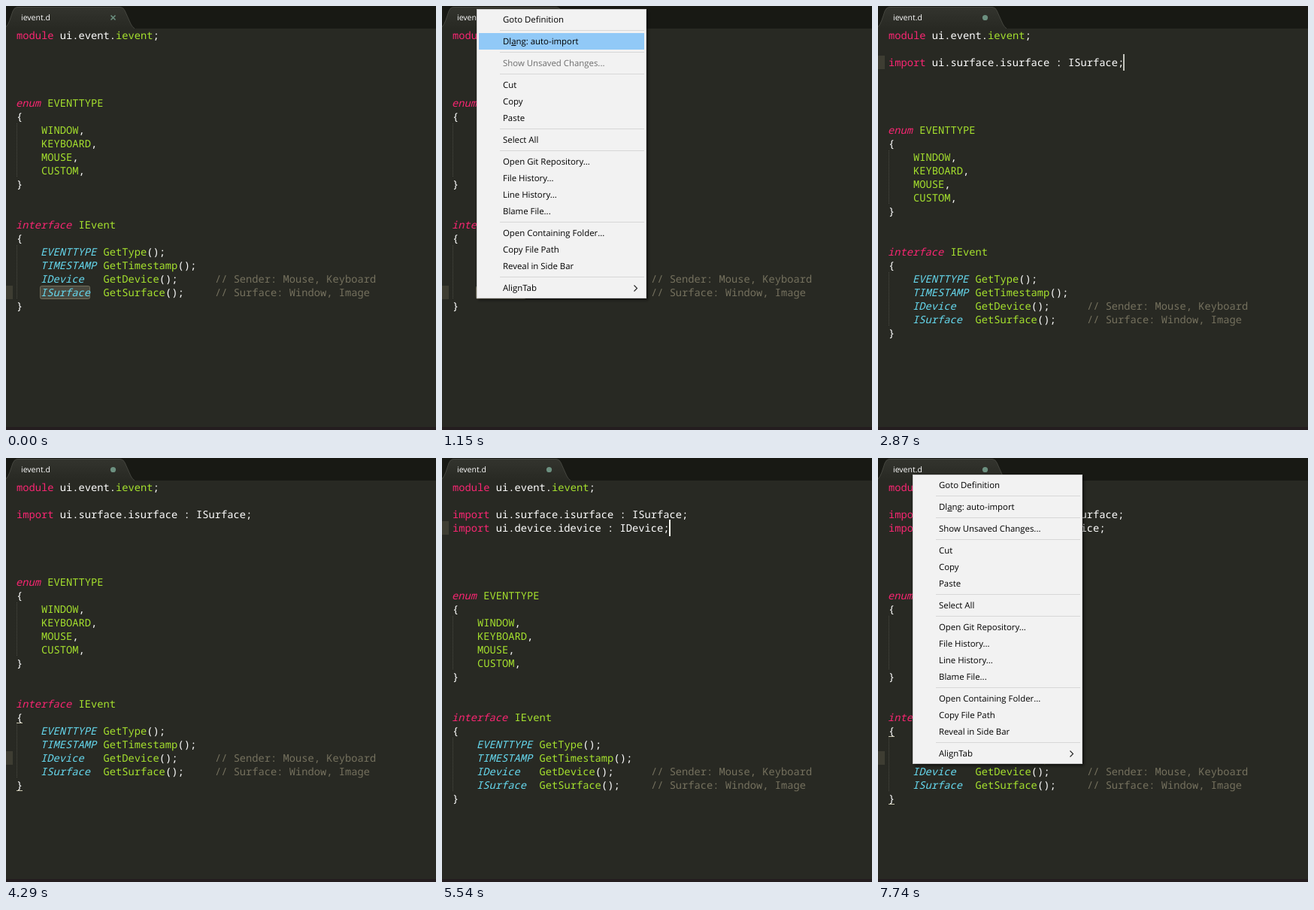
These frames come from a looping animation (572 by 564 pixels, 8 s). An HTML page with a canvas:

```html
<!DOCTYPE html>
<html lang="en">
<head>
<meta charset="utf-8">
<title>Auto-import in an editor</title>
<style>
html, body { margin: 0; height: 100%; overflow: hidden; background: #282923; }
canvas { display: block; }
</style>
</head>
<body>
<canvas id="stage" width="572" height="564"></canvas>
<script>
const ctx = document.getElementById('stage').getContext('2d', { alpha: false });
ctx.textRendering = 'geometricPrecision';

const LOOP = 8000, LEFT = 14, ADVANCE = 8.247, TOP = 30, ROW = 18;
const CODE_FONT = '500 13.745px "Noto Sans Mono", monospace';
const MENU_FONT = '11.4px "Open Sans", sans-serif';

// Each segment starts with a style key: capital letters are italic.
const COLORS = { p: '#f92672', g: '#a6e22e', c: '#66d9ef', w: '#ffffff', n: '#75715e' };
const IMPORTS = [
  'pimport|w ui.surface.isurface : ISurface;',
  'pimport|w ui.device.idevice : IDevice;'
];
const BODY = [
  '', '', '', '',
  'Penum|w |gEVENTTYPE', 'w{',
  'w    |gWINDOW|w,', 'w    |gKEYBOARD|w,', 'w    |gMOUSE|w,', 'w    |gCUSTOM|w,',
  'w}', '', '',
  'Pinterface|w |gIEvent', 'w{',
  'w    |CEVENTTYPE|w |gGetType|w();',
  'w    |CTIMESTAMP|w |gGetTimestamp|w();',
  'w    |CIDevice|w   |gGetDevice|w();      |n// Sender: Mouse, Keyboard',
  'w    |CISurface|w  |gGetSurface|w();     |n// Surface: Window, Image',
  'w}'
];
const MENU = [
  'Goto Definition', '-', 'Dlang: auto-import', '-', 'Show Unsaved Changes...', '-',
  'Cut', 'Copy', 'Paste', '-', 'Select All', '-',
  'Open Git Repository...', 'File History...', 'Line History...', 'Blame File...', '-',
  'Open Containing Folder...', 'Copy File Path', 'Reveal in Side Bar', '-', 'AlignTab'
];

// Every entry changes part of the state from its time on.
const TIMELINE = [
  [0, { imports: 0, row: 19, col: 4, caret: 0, selected: true, menu: 0, menuTop: 4, hover: '' }],
  [70, { menu: .6 }], [230, { menu: 1 }],
  [610, { hover: 'AlignTab' }], [720, { hover: 'Reveal in Side Bar' }],
  [830, { hover: 'Blame File...' }], [940, { hover: 'Paste' }],
  [1040, { hover: 'Cut' }], [1150, { hover: 'Dlang: auto-import' }],
  [1380, { imports: 1, row: 2, col: 38, caret: 1, selected: false, menu: 0, menuTop: 22, hover: '' }],
  [1700, { caret: .66 }], [1860, { caret: .33 }], [2010, { caret: 0 }],
  [2390, { caret: .33 }], [2470, { caret: .66 }], [2560, { caret: 1 }],
  [2870, { caret: .75 }], [2940, { caret: .35 }],
  [3030, { row: 21, col: 4, caret: 1, selected: true }],
  [3400, { caret: .66 }], [3520, { caret: .33 }],
  [3640, { row: 20, caret: 1, selected: false }],
  [4050, { caret: .75 }], [4130, { caret: .5 }], [4210, { caret: .25 }], [4290, { caret: 0 }],
  [4520, { menu: .6 }], [4600, { menu: 1 }],
  [4790, { hover: 'Reveal in Side Bar', caret: .66 }],
  [4980, { hover: 'Line History...', caret: 1 }],
  [5130, { hover: 'Goto Definition', caret: .5 }],
  [5230, { hover: 'Dlang: auto-import', caret: 0 }],
  [5540, { imports: 2, row: 3, col: 35, caret: 1, menu: 0, hover: '' }],
  [5930, { caret: .5 }], [6080, { caret: 0 }],
  [6540, { row: 21, col: 4, caret: 1 }], [6950, { row: 20 }],
  [7360, { caret: .6 }], [7480, { caret: 0 }],
  [7600, { menu: .6 }], [7740, { menu: 1 }]
];

const stateAt = t =>
  Object.assign({}, ...TIMELINE.filter(([start]) => start <= t).map(([, change]) => change));
const colX = col => LEFT + col * ADVANCE;
const rowY = row => TOP + row * ROW;

function rect(x, y, w, h, color) {
  ctx.fillStyle = color;
  ctx.fillRect(x, y, w, h);
}

function text(str, x, y, color, font) {
  ctx.font = font;
  ctx.fillStyle = color;
  ctx.fillText(str, x, y);
}

function stroke(path, color, width = 1) {
  ctx.strokeStyle = color;
  ctx.lineWidth = width;
  ctx.stroke(new Path2D(path));
}

function drawTab(dirty) {
  rect(0, 0, 572, TOP, '#181914');
  const edge = 'M0 28 Q3 25 5 19 L9 7 Q11 1.5 15 1.5 H152 Q156 1.5 158 6 L166 24 Q168 28 171 30';
  const fill = ctx.createLinearGradient(0, 1, 0, TOP);
  fill.addColorStop(0, '#33342e');
  fill.addColorStop(1, '#282923');
  ctx.fillStyle = fill;
  ctx.fill(new Path2D(edge + ' H0 Z'));
  stroke(edge, '#44453e');
  text('ievent.d', 20, 19, '#fff', '500 10.5px "Open Sans", sans-serif');
  if (dirty) {
    ctx.fillStyle = '#6c9080';
    ctx.beginPath();
    ctx.arc(142.5, 15.5, 3.6, 0, 7);
    ctx.fill();
  } else {
    stroke('M139.5 12.5 l6 6 m0 -6 l-6 6', '#6c9080', 1.6);
  }
}

function drawLine(line, row) {
  let col = 0;
  for (const segment of line.split('|')) {
    const key = segment[0], str = segment.slice(1);
    if (!key) continue;
    const italic = key < 'a';
    text(str, colX(col) - (italic ? 1 : 0), rowY(row) + 14,
      COLORS[key.toLowerCase()], (italic ? 'italic ' : '') + CODE_FONT);
    col += str.length;
  }
}

// Box around the eight letters of "ISurface".
function drawMatch(col, row, fill) {
  ctx.beginPath();
  ctx.roundRect(Math.floor(colX(col)) - .5, rowY(row) + .5, 8 * ADVANCE, ROW - 1, 2);
  ctx.fillStyle = fill;
  ctx.fill();
  ctx.strokeStyle = '#75715e';
  ctx.lineWidth = 1;
  ctx.stroke();
}

function drawCode(s) {
  const head = ['pmodule|w ui.event.|gievent|w;'];
  if (s.imports) head.push('', ...IMPORTS.slice(0, s.imports));
  const lines = [...head, ...BODY];
  const opening = lines.lastIndexOf('w{'), closing = lines.length - 1;

  rect(0, rowY(s.row), 9, ROW, '#3e3d32');
  if (s.selected) {
    drawMatch(4, s.row, '#49483e');
    if (s.imports) drawMatch(29, 2, 'transparent');
  }
  ctx.setLineDash([1, 1]);
  for (const first of [lines.indexOf('w{') + 1, opening + 1])
    stroke(`M14.5 ${rowY(first)} v${4 * ROW}`, '#4a4b43');
  ctx.setLineDash([]);
  lines.forEach(drawLine);
  if (!s.selected && s.row > opening)
    for (const row of [opening, closing]) rect(14, rowY(row) + 16, 8, 1, '#c9c5ae');

  ctx.globalAlpha = s.caret;
  rect(Math.round(colX(s.col)) - 1, rowY(s.row) - 2, 2, 22, '#f8f8f0');
  ctx.globalAlpha = 1;
}

function drawMenu(s) {
  ctx.globalAlpha = s.menu;
  ctx.shadowColor = 'rgba(0,0,0,.6)';
  ctx.shadowBlur = 4;
  ctx.shadowOffsetX = ctx.shadowOffsetY = 2;
  rect(46, s.menuTop, 226, 385, '#cccccc');
  ctx.shadowColor = 'transparent';
  rect(47, s.menuTop + 1, 224, 383, '#f2f2f2');

  let y = s.menuTop + 3;
  for (const label of MENU) {
    if (label === '-') {
      rect(77, y + 3, 192, 1, '#d7d7d7');
      y += 7;
      continue;
    }
    if (label === s.hover) rect(49, y, 220, 22, '#91c9f7');
    const disabled = label.startsWith('Show') && !s.imports;
    text(label, 81, y + 15, disabled ? '#6d6d6d' : '#000', MENU_FONT);
    if (label.startsWith('Dlang')) {
      const x = 81 + ctx.measureText('Dl').width;
      rect(x, y + 16, ctx.measureText('a').width, 1, '#000');
    }
    if (label === 'AlignTab') stroke(`M255.5 ${y + 7.5} l4 4 l-4 4`, '#222', 1.1);
    y += 22;
  }
  ctx.globalAlpha = 1;
}

function draw() {
  const s = stateAt(performance.now() % LOOP);
  rect(0, 0, 572, 564, '#282923');
  drawTab(s.imports > 0);
  drawCode(s);
  rect(0, 560, 572, 4, '#241d1f');
  if (s.menu) drawMenu(s);
  requestAnimationFrame(draw);
}
draw();
</script>
</body>
</html>
```
